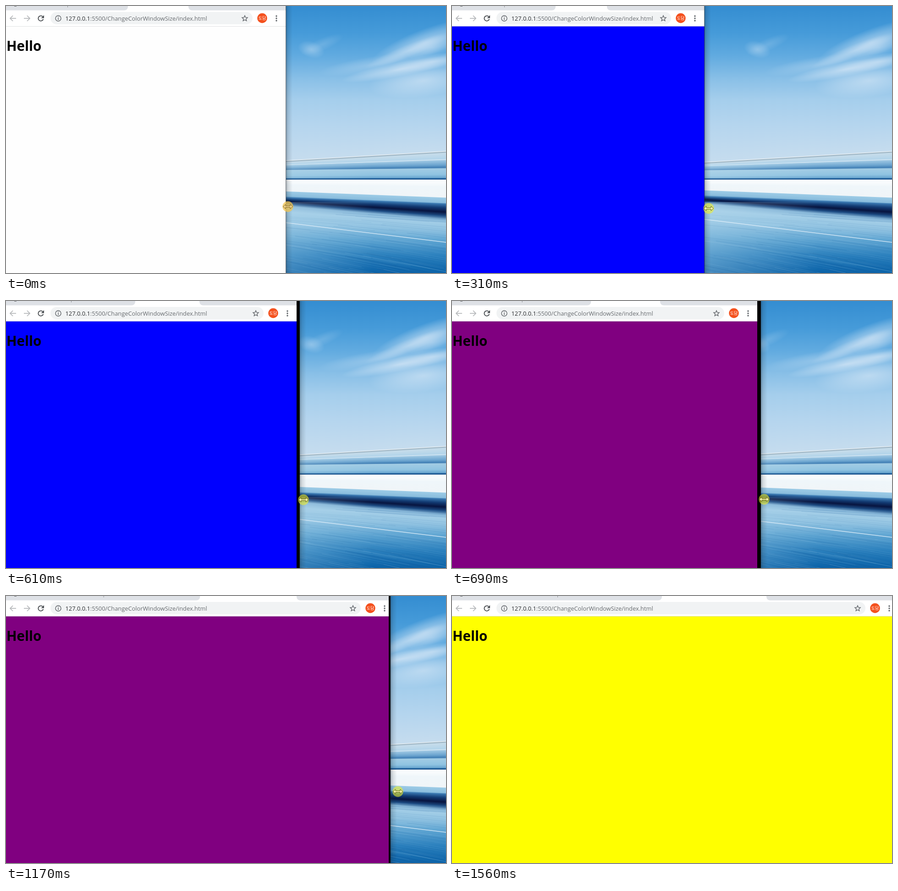
Animation of 960 by 583 pixels, one loop 1.62 s. Source, as an HTML page with a canvas:

```html
<!DOCTYPE html>
<html lang="ko">
<head>
<meta charset="utf-8">
<title>Window resize</title>
<style>
  html, body { margin: 0; width: 100%; height: 100%; overflow: hidden; background: #fff; }
  canvas { display: block; }
</style>
</head>
<body>
<canvas id="stage" width="960" height="583"></canvas>
<script>
const W = 960, H = 583, LOOP = 1620, TAU = Math.PI * 2;
const ctx = document.getElementById('stage').getContext('2d');

// Moments at which the picture is refreshed
const STEPS = [0, 80, 150, 310, 370, 450, 530, 610, 690, 780, 860, 930,
  1020, 1090, 1170, 1260, 1340, 1400, 1480, 1560];

// time, window edge, painted width, layout width, pointer x, pointer y
const KEYS = [
  [0, 611, 611, 611, 615, 438],
  [80, 576, 576, 576, 578, 440],
  [150, 541, 541, 541, 546, 442],
  [310, 551, 551, 551, 560, 442],
  [610, 641, 634, 635, 649, 434],
  [930, 772, 762, 762, 778, 430],
  [1170, 839, 835, 847, 855, 427],
  [1260, 855, 855, 855, 904, 427],
  [1340, 901, 901, 900, 940, 427],
  [1560, 976, 976, 975, 990, 427],
];

// Wallpaper layers: height at x = 550, height at x = 960, colour
const LAYERS = [
  [0, 0, '#348dd1'], [60, 60, '#469bd9'], [110, 110, '#62abe0'], [160, 160, '#8ac0e7'],
  [205, 205, '#a5ceec'], [260, 260, '#b5d5ee'], [340, 316, '#c5dcee'],
  [341, 317, '#eef4f8'], [343, 319, '#93acbc'], [345, 321, '#c6dcea'],
  [348, 334, '#b2d4ea'], [349, 335, '#dcebf5'], [350, 337, '#9cc6e2'],
  [355, 347, '#6ba4cf'], [358, 353, '#3f7db3'], [359, 355, '#a2cce4'],
  [372, 368, '#8fc3e1'], [376, 375, '#68a5cf'], [377, 377, '#1a5792'], [379, 379, '#0f4a88'],
  [379, 379, '#ffffff'], [390, 395, '#eff6fa'], [402, 418, '#f0f5f8'],
  [403, 419, '#9ccbe6'], [413, 430, '#8abddd'], [416, 432, '#3a79b2'],
  [420, 441, '#123a72'], [423, 450, '#07143f'], [427, 459, '#1c4c84'],
  [432, 467, '#86b6d8'], [445, 476, '#a0cce6'], [470, 490, '#90c2e1'],
  [505, 512, '#5fa5d2'], [545, 545, '#2b80bd'], [583, 583, '#0a62a8'],
];

// Clouds: x, y, half length, half thickness, tilt, opacity
const CLOUDS = [
  [915, 80, 125, 30, -0.36, 0.6], [880, 97, 105, 14, -0.38, 0.45],
  [930, 90, 60, 22, -0.3, 0.4], [860, 138, 130, 16, -0.19, 0.7],
  [930, 122, 100, 17, -0.16, 0.6], [910, 163, 120, 36, -0.12, 0.6],
  [800, 128, 120, 18, -0.15, 0.3], [666, 95, 30, 18, 0.3, 0.35],
  [690, 84, 50, 14, -0.4, 0.18],
];

let seed = 7;
const random = () => (seed = seed * 16807 % 2147483647) / 2147483647;

function stroke(c, color, width, points) {
  c.strokeStyle = color;
  c.lineWidth = width;
  c.beginPath();
  points.forEach(([x, y]) => c.lineTo(x, y));
  c.stroke();
}

function disc(x, y, r, color) {
  ctx.fillStyle = color;
  ctx.beginPath();
  ctx.arc(x, y, r, 0, TAU);
  ctx.fill();
}

function box(x, y, w, h, color, radii = 0) {
  ctx.fillStyle = color;
  ctx.beginPath();
  ctx.roundRect(x, y, w, h, radii);
  ctx.fill();
}

function text(string, x, y, font, color, align = 'left') {
  ctx.font = font;
  ctx.fillStyle = color;
  ctx.textAlign = align;
  ctx.fillText(string, x, y);
}

function cloud(c, [x, y, length, thickness, tilt, alpha]) {
  c.save();
  c.translate(x, y);
  c.rotate(tilt);
  c.scale(length, thickness);
  const glow = c.createRadialGradient(0, 0, 0, 0, 0, 1);
  glow.addColorStop(0, `rgba(220,234,247,${alpha})`);
  glow.addColorStop(0.5, `rgba(220,234,247,${alpha * 0.55})`);
  glow.addColorStop(1, 'rgba(220,234,247,0)');
  c.fillStyle = glow;
  c.fillRect(-1, -1, 2, 2);
  c.restore();
}

function makeWallpaper() {
  const canvas = document.createElement('canvas');
  canvas.width = W;
  canvas.height = H;
  const c = canvas.getContext('2d');
  for (let x = 520; x < W; x++) {
    const gradient = c.createLinearGradient(0, 0, 0, H);
    const p = (x - 550) / 410;
    for (const [left, right, color] of LAYERS) {
      gradient.addColorStop((left + (right - left) * p) / H, color);
    }
    c.fillStyle = gradient;
    c.fillRect(x, 0, 1, H);
  }
  CLOUDS.forEach(shape => cloud(c, shape));

  const haze = c.createLinearGradient(540, 0, 800, 0);
  haze.addColorStop(0, 'rgba(195,224,240,.35)');
  haze.addColorStop(1, 'rgba(195,224,240,0)');
  c.fillStyle = haze;
  c.fillRect(520, 345, 280, 32);
  c.fillRect(520, 428, 280, 155);

  for (let i = 0; i < 180; i++) {
    const y = 440 + random() * 140, x = 500 + random() * 380;
    const length = 80 + random() * 200, slope = (y - 395) * 0.0014;
    const tone = random() < 0.5 ? '195,226,243' : '0,75,140';
    stroke(c, `rgba(${tone},${0.04 + random() * 0.1})`, 1, [[x, y + 12], [x + length, y + 12 + length * slope]]);
  }
  stroke(c, 'rgba(225,239,250,.85)', 1.6, [[520, 462], [W, 516]]);
  return canvas;
}

function starPoints(x, y) {
  return Array.from({ length: 12 }, (_, i) => {
    const r = i % 2 ? 2.9 : 6.3, a = i * TAU / 10 - TAU / 4;
    return [x + r * Math.cos(a), y + r * Math.sin(a)];
  });
}

function drawTabs(width) {
  const w = Math.min(width, 899) - 611;
  const leftEnd = 266 + w * 2 / 3, rightStart = 398 + w;
  box(0, 0, leftEnd, 9.5, '#dee1e6', [0, 0, 8, 0]);
  box(rightStart, 0, W, 9.5, '#dee1e6', [0, 0, 0, 8]);
  box(134 + w / 3, 0, 1, 3, '#8d9095');
  box(18, 0, 5, 1, '#63666a');
}

function drawToolbar(width) {
  const gray = '#5f6368', pale = '#b4b6b9';
  box(97, 13, width - 170, 27, '#f1f3f4', 13.5);

  for (const [x, d] of [[15, 1], [46, -1]]) {
    stroke(ctx, pale, 1.7, [[x + 7 * d, 27], [x - 6 * d, 27]]);
    stroke(ctx, pale, 1.7, [[x, 21], [x - 6 * d, 27], [x, 33]]);
  }

  ctx.strokeStyle = '#4d5155';
  ctx.lineWidth = 1.9;
  ctx.beginPath();
  ctx.arc(76, 27, 5.6, 0.3, TAU - 0.75);
  ctx.stroke();
  ctx.fillStyle = '#4d5155';
  ctx.beginPath();
  [[83, 20], [83, 26.5], [76.5, 26.5]].forEach(([x, y]) => ctx.lineTo(x, y));
  ctx.fill();

  ctx.strokeStyle = gray;
  ctx.lineWidth = 1.4;
  ctx.beginPath();
  ctx.arc(114, 27, 6, 0, TAU);
  ctx.stroke();
  box(113.3, 26, 1.5, 4.5, gray);
  box(113.3, 23.3, 1.5, 1.5, gray);

  const urlFont = '12.83px "Open Sans", "Noto Sans", sans-serif';
  text('127.0.0.1', 129.5, 31.5, urlFont, '#2b2d30');
  const hostWidth = ctx.measureText('127.0.0.1').width;
  text(':5500/ChangeColorWindowSize/index.html', 129.5 + hostWidth, 31.5, urlFont, '#686c70');

  stroke(ctx, gray, 1.4, starPoints(width - 90, 27.3));
  disc(width - 52, 26.5, 10.7, '#f4511e');
  text('도담', width - 52, 30, '9px "Noto Sans CJK KR", "Noto Sans CJK", sans-serif', '#fff', 'center');
  for (const y of [22, 27, 32]) disc(width - 21, y, 1.7, gray);
}

function drawPointer(x, y, pressed) {
  disc(x, y, 11.7, pressed ? 'rgba(242,196,80,.75)' : 'rgba(240,240,40,.58)');
  ctx.fillStyle = pressed ? '#ecd08a' : '#f7f5a6';
  ctx.strokeStyle = pressed ? '#86692a' : '#66661c';
  ctx.lineWidth = 1;
  ctx.beginPath();
  for (const d of [-1, 1]) {
    [[5, 1.5], [5, 5], [10.5, 0], [5, -5], [5, -1.5]]
      .forEach(([px, py]) => ctx.lineTo(x + px * d, y + py * d));
  }
  ctx.closePath();
  ctx.fill();
  ctx.stroke();
}

function pose(t) {
  const i = Math.max(1, KEYS.findIndex(k => k[0] >= t));
  const a = KEYS[i - 1], b = KEYS[i], p = (t - a[0]) / (b[0] - a[0]);
  return a.slice(1).map((v, n) => Math.round(v + (b[n + 1] - v) * p));
}

function pageColor(t, width) {
  if (t === 0) return '#fefefe';
  if (width < 660) return '#0000ff';
  return width < 850 ? '#800080' : '#ffff00';
}

const wallpaper = makeWallpaper();

function draw(time) {
  const t = STEPS.findLast(s => s <= time);
  const [edge, painted, width, x, y] = pose(t);
  ctx.drawImage(wallpaper, 0, 0);

  const shadow = ctx.createLinearGradient(edge, 0, edge + 14, 0);
  shadow.addColorStop(0, 'rgba(20,30,40,.35)');
  shadow.addColorStop(0.3, 'rgba(20,30,40,.14)');
  shadow.addColorStop(1, 'rgba(20,30,40,0)');
  ctx.fillStyle = shadow;
  ctx.fillRect(edge, 0, 14, H);

  box(0, 0, edge, H, '#000');
  ctx.save();
  ctx.beginPath();
  ctx.rect(0, 0, painted, H);
  ctx.clip();
  box(0, 0, painted, 44, '#fff');
  drawTabs(width);
  drawToolbar(width);
  box(0, 44, painted, H, pageColor(t, width));
  box(0, 44, painted, 1, 'rgba(205,208,211,.6)');
  text('Hello', 1, 98, '700 29.5px "Open Sans", "Noto Sans", sans-serif', '#000');
  ctx.restore();
  box(edge - 1, 0, 1, H, 'rgba(20,30,40,.6)');

  drawPointer(x, y, t === 0);
}

const start = performance.now();
function tick() {
  draw((performance.now() - start) % LOOP);
  requestAnimationFrame(tick);
}
tick();
</script>
</body>
</html>
```
